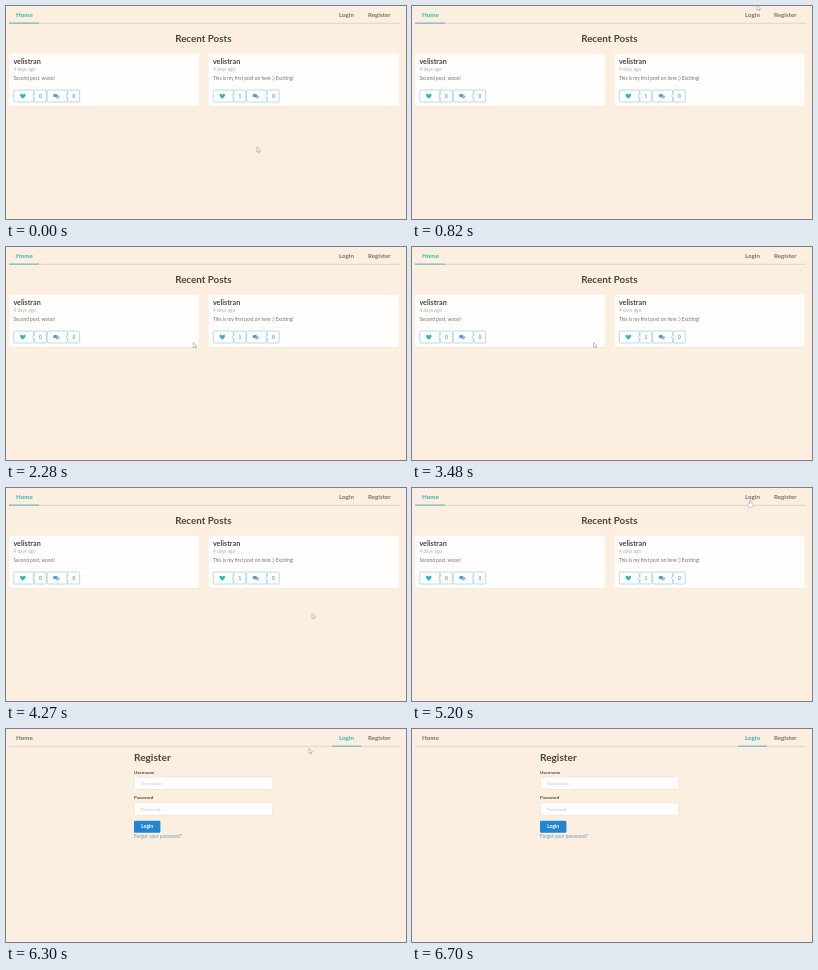
An HTML page with a canvas for the animation above (8000 ms loop, 400x213 px).

```html
<!DOCTYPE html>
<html lang="en">
<head>
<meta charset="utf-8">
<title>Recent Posts</title>
<style>
html, body { margin: 0; width: 100%; height: 100%; overflow: hidden; background: #fdefdf; }
canvas { display: block; width: 400px; height: 213px; }
</style>
</head>
<body>
<canvas id="stage"></canvas>
<script>
const W = 400, H = 213, LOOP = 8000, STEP = 100;
const LOGIN_AT = 5390, HAND_AT = 4740, ARROW_AT = 6300, HIDE_AT = 6700;
const BG = '#fdefdf', INK = '#4a4440', GREY = '#76706b', TEAL = '#30b8b0', BLUE = '#2185d0', EDGE = '#95c8d6';
const canvas = document.getElementById('stage');
const ctx = canvas.getContext('2d');
const dpr = window.devicePixelRatio || 1;
canvas.width = Math.round(W * dpr);
canvas.height = Math.round(H * dpr);

const linear = k => k;
const settle = k => 1 - (1 - k * k) ** 6;

// Each move starts where the previous one ended and advances once per STEP.
const START = [251, 141];
const moves = [
  { at: 120, steps: 3, to: [357, -8] },
  { at: 820, steps: 9, to: [188, 91], ease: settle },
  { at: 1680, steps: 3, to: [187.5, 94] },
  { at: 2090, steps: 2, to: [187.3, 95.5] },
  { at: 3480, steps: 1, to: [181.5, 95.5] },
  { at: 3880, steps: 9, to: [338, 15], bend: [371, 188] },
  { at: HAND_AT, steps: 2, to: [337.7, 12] },
  { at: ARROW_AT, steps: 4, to: [199, 41] }
];

function pointerAt(t) {
  let pos = START;
  for (const { at, steps, to, bend, ease = linear } of moves) {
    if (t < at) break;
    const k = ease(Math.min(1, (Math.floor((t - at) / STEP) + 1) / steps));
    const from = pos;
    pos = to.map((end, i) => {
      const mid = bend ? bend[i] : (from[i] + end) / 2;
      return (1 - k) ** 2 * from[i] + 2 * k * (1 - k) * mid + k * k * end;
    });
  }
  return pos;
}

function text(str, x, y, size, color, weight = 400, align = 'left') {
  ctx.font = `${weight} ${size}px Lato, sans-serif`;
  ctx.fillStyle = color;
  ctx.textAlign = align;
  ctx.fillText(str, x, y);
}

function paint(fill, stroke) {
  ctx.fillStyle = fill;
  ctx.fill();
  if (!stroke) return;
  ctx.strokeStyle = stroke;
  ctx.lineWidth = 0.65;
  ctx.stroke();
}

function box(x, y, w, h, r, fill, stroke) {
  ctx.beginPath();
  ctx.roundRect(x, y, w, h, r);
  paint(fill, stroke);
}

function rect(x, y, w, h, color) {
  ctx.fillStyle = color;
  ctx.fillRect(x, y, w, h);
}

function menu(active) {
  rect(3, 16.8, 391, 0.8, '#d3cfc8');
  const items = [['Home', 10, 30], ['Login', 333, 29], ['Register', 362, 39]];
  for (const [name, x, width] of items) {
    const on = name === active;
    text(name, x, 11, 6.2, on ? TEAL : GREY, 700);
    if (on) rect(x - 7, 16.6, width, 1, '#62b0c6');
  }
}

function heart(x, y) {
  ctx.beginPath();
  ctx.moveTo(x, y + 2.5);
  ctx.bezierCurveTo(x - 5, y - 1, x - 2, y - 4, x, y - 1.3);
  ctx.bezierCurveTo(x + 2, y - 4, x + 5, y - 1, x, y + 2.5);
  paint(TEAL);
}

function bubble(x, y, rx, ry, tail, color) {
  ctx.beginPath();
  ctx.ellipse(x, y, rx, ry, 0, 0, Math.PI * 2);
  ctx.moveTo(x, y + ry * 0.6);
  ctx.lineTo(x + tail, y + ry + 0.6);
  ctx.lineTo(x + tail * 0.8, y);
  paint(color);
}

function comments(x, y) {
  const blue = '#559ad2';
  bubble(x + 1.3, y + 0.7, 2, 1.5, 1.8, blue);
  bubble(x - 0.8, y - 0.6, 2.7, 2, -1.9, '#fff');
  bubble(x - 0.8, y - 0.6, 2.3, 1.6, -1.9, blue);
}

function counter(x, icon, count) {
  box(x, 84, 20, 12, 1.2, '#fff', EDGE);
  box(x + 20.5, 84, 12, 12, 1.2, '#fff', EDGE);
  // label's pointer, covering the seam
  ctx.beginPath();
  ctx.moveTo(x + 21, 87.8);
  ctx.lineTo(x + 18.6, 90);
  ctx.lineTo(x + 21, 92.2);
  paint('#fff', EDGE);
  icon(x + 9, 90);
  text(count, x + 26.6, 91.8, 4.8, '#6a9ca8', 700, 'center');
}

function card(x, name, body, likes) {
  box(x, 48, 190.2, 52.5, 1.4, '#f1e5d8');
  box(x, 47.8, 190.2, 52.1, 1.4, '#fffefd');
  rect(x, 80.2, 190.2, 0.4, '#f6f2ee');
  text(name, x + 4.4, 58, 7.2, INK, 700);
  text('4 days ago', x + 4.4, 64.6, 4.8, '#b4b0ad');
  text(body, x + 4.4, 73.6, 4.8, '#76716c');
  counter(x + 4.8, heart, likes);
  counter(x + 38.2, comments, '0');
}

function postsPage() {
  menu('Home');
  text('Recent Posts', 197.3, 35.6, 9.8, INK, 700, 'center');
  card(3, 'velistran', 'Second post, wooo!', '0');
  card(202.5, 'velistran', 'This is my first post on here :) Exciting!', '1');
}

function field(label, y) {
  text(label, 128, y, 4.5, INK, 700);
  box(128.2, y + 3.4, 138.6, 12.4, 1.2, '#fffefd', '#eadfd3');
  text(label + '...', 135, y + 11.2, 4.6, '#c9c5c2');
}

function loginPage() {
  menu('Login');
  text('Register', 128, 32.3, 10.1, INK, 700);
  field('Username', 44.6);
  field('Password', 70.4);
  box(128, 91.8, 26.4, 11.9, 1.2, BLUE);
  text('Login', 141.2, 99.4, 4.9, '#fff', 700, 'center');
  text('Forgot your password?', 128, 109, 4.8, '#6499ca');
}

function arrow(x, y) {
  ctx.beginPath();
  ctx.moveTo(x, y);
  ctx.lineTo(x, y + 5.2);
  ctx.lineTo(x + 1.3, y + 4.2);
  ctx.lineTo(x + 2.4, y + 6);
  ctx.lineTo(x + 2.2, y + 3.9);
  ctx.lineTo(x + 3.7, y + 3.8);
  ctx.closePath();
  paint('#fff', '#a3a1ab');
}

function hand(x, y) {
  box(x - 1.8, y + 3, 5.2, 4.2, 1.4, '#fff', '#a9a6aa');
  box(x - 0.2, y, 1.3, 5, 0.6, '#fff', '#a9a6aa');
  rect(x - 0.9, y + 3.6, 3.4, 2.6, '#fff');
}

function draw(now) {
  const t = now % LOOP;
  ctx.setTransform(dpr, 0, 0, dpr, 0, 0);
  rect(0, 0, W, H, BG);
  if (t < LOGIN_AT) postsPage(); else loginPage();
  if (t >= HIDE_AT) return;
  const cursor = t >= HAND_AT && t < ARROW_AT ? hand : arrow;
  cursor(...pointerAt(t));
}

const began = performance.now();
function frame() {
  draw(performance.now() - began);
  requestAnimationFrame(frame);
}
frame();
</script>
</body>
</html>
```
